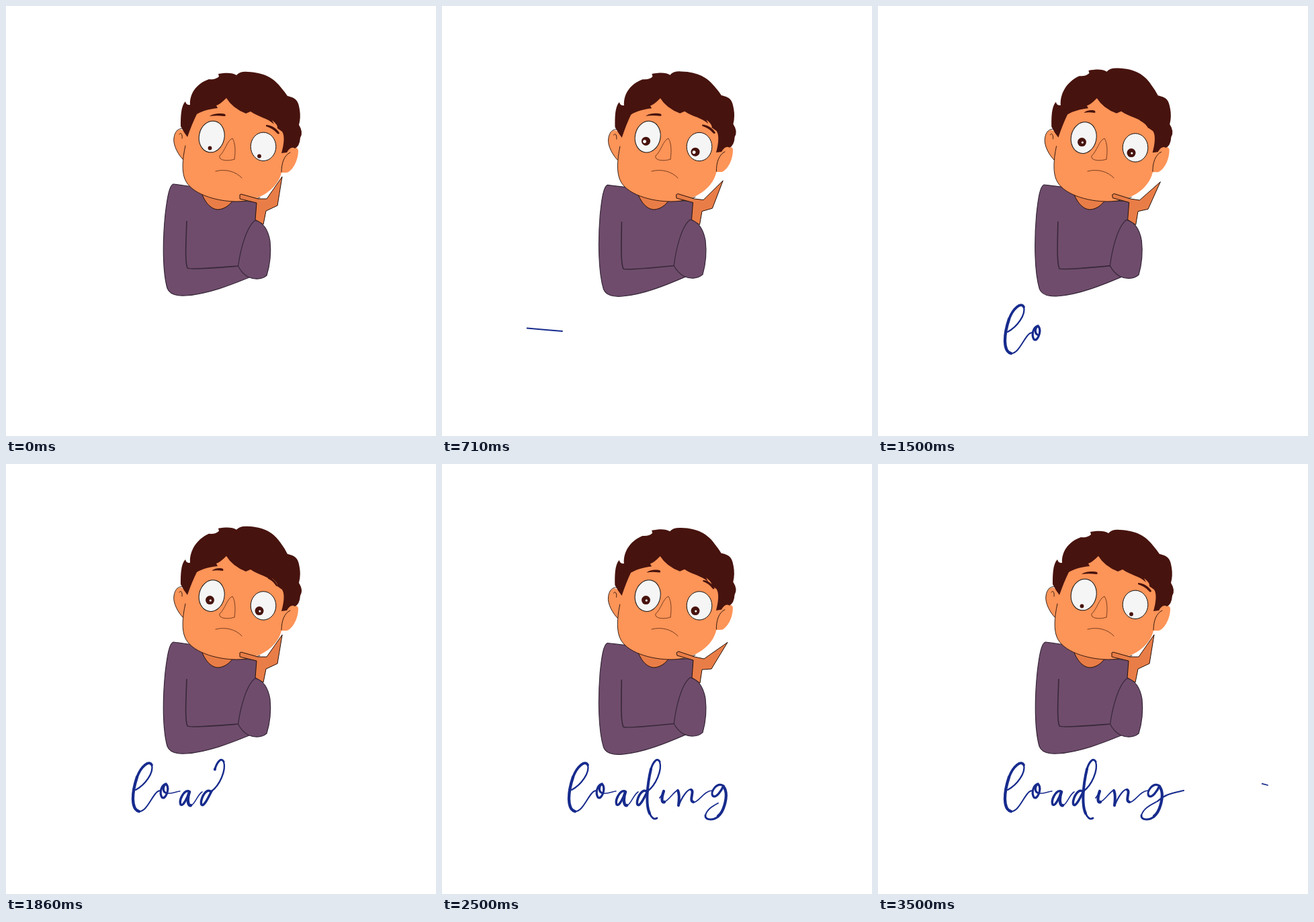
An HTML page for the animation above (3.57 s loop, 640 px wide and 640 px high).

```html
<!DOCTYPE html>
<html lang="en">
<head>
<meta charset="utf-8">
<title>Loading</title>
<style>
html, body { margin: 0; width: 100%; height: 100%; overflow: hidden; background: #fff; }
svg { display: block; width: 100%; height: 100%; }
.line { fill: none; stroke: #241008; stroke-width: .9; stroke-linecap: round; }
.fine { stroke: #5a2a12; stroke-width: .8; }
.skin { fill: #fd9458; }
.shade { fill: #e97d47; stroke: #241008; stroke-width: 1; stroke-linejoin: round; }
.dark { fill: #47130e; }
.cloth { fill: #6f4c6c; stroke: #38283a; stroke-width: 1.2; stroke-linejoin: round; }
.crease { fill: none; stroke-width: 1.6; }
.white { fill: #f5f5f5; stroke: #111; stroke-width: 1; }
#ink { fill: none; stroke: #172b8d; stroke-linecap: round; }
</style>
</head>
<body>
<svg viewBox="0 0 640 640">
  <g id="body">
    <path class="cloth" d="M249 265C243 267 240 285 237 310C233 350 233 395 240 420C243 428 252 432 268 431C300 429 335 415 362 404L380 370L376 319L377 293Q372 290 364 291L337 290L292 279L278 269Z"/>
    <path class="cloth crease" d="M269 320C268 350 266 380 270 390C273 393 320 389 346 387"/>
  </g>
  <path class="shade" d="M291 278C297 295 307 303 316 303C326 302 333 296 338 289Z"/>
  <g id="head">
    <path class="skin" d="M270 194C264 180 253 180 250 196C248 207 257 222 263 228L275 235Z"/>
    <path class="line" d="M267 185C262 180 252 182 250 196C248 207 257 222 263 228M258 191C260 187 263 191 262 197"/>
    <path class="skin" d="M408 222C416 208 434 207 435 215C435 232 425 246 418 248L406 248Z"/>
    <path class="skin" d="M267 208C262 230 262 247 266 257C274 279 312 291 343 291C380 291 405 270 410 248L415 214L421 170L330 130L280 150L268 185Z"/>
    <path class="line" d="M267 208C262 230 262 247 266 257C274 279 312 291 343 291C358 291 370 288 378 285M423 218C414 222 410 234 410 247"/>
    <path class="dark" id="hair"/>
  </g>
  <g id="eyes">
    <ellipse class="white" cx="306.2" cy="194.5" rx="18.8" ry="23.5" transform="rotate(12 306.2 194.5)"/>
    <ellipse class="white" cx="383" cy="209.3" rx="18.8" ry="21.2"/>
  </g>
  <path class="dark" id="browL" d="M303 164C308 160 320 159 326 161Q328 164 325 164C317 163 310 163 303 164Z"/>
  <path class="dark" id="browR" d="M387 177C395 177 403 182 407 189Q406 192 403 189C398 183 392 181 387 179Z"/>
  <path class="line fine" d="M340 228C342 215 341 203 337 197C329 200 326 216 318 223C316 231 333 231 340 228M312 246C326 242 342 246 351 256"/>
  <path class="shade" id="hand"/>
  <path class="cloth" id="sleeve" d="M371 319C382 322 390 332 393 350C395 370 392 388 388 401C380 408 368 407 360 403C353 399 348 392 345.500 387C349 362 358 328 371 319Z"/>
  <g id="ink"></g>
</svg>
<script>
const LOOP = 3570;
const $ = id => document.getElementById(id);
const make = (tag, parent, attrs) => {
  const el = document.createElementNS("http://www.w3.org/2000/svg", tag);
  set(el, attrs);
  return parent.appendChild(el);
};
function set(el, attrs) {
  for (const k in attrs) el.setAttribute(k, attrs[k]);
}
const ramp = (t, a, b) => Math.min(1, Math.max(0, (t - a) / (b - a)));
const ease = (t, a, b) => { const u = ramp(t, a, b); return u * u * (3 - 2 * u); };
const mix = (a, b, u) => a + (b - a) * u;

// path, width, start and end of drawing, optional start and end of erasing
const strokes = [
  ["M81 475C110 478 150 482 193 485", 1.8, 70, 801, 560, 930],
  ["M193 485C208 477 220 459 217 448", 2.3, 801, 1040],
  ["M217 448C213 440 201 450 195 466", 3.7, 1040, 1210],
  ["M195 466C187 490 186 514 198 517", 4.3, 1210, 1330],
  ["M198 517C208 518 215 499 223 490Q226 486 231 486", 2, 1330, 1420],
  ["M238 476C231 478 228 489 232 496C237 501 244 484 239 477C235 475 232 486 237 489", 3.2, 1420, 1500],
  ["M237 489C245 493 253 487 259 487", 1.5, 1500, 1540],
  ["M272 487C265 485 257 500 260 507C264 510 270 496 273 488", 3.4, 1540, 1610],
  ["M273 488C269 499 271 510 275 508", 4.4, 1610, 1640],
  ["M276 508C282 505 285 492 292 488", 1.6, 1640, 1680],
  ["M304 487C297 482 288 501 291 507C295 511 302 494 306 487", 3.5, 1680, 1790],
  ["M306 487C318 478 328 456 324 443", 2.3, 1790, 1830],
  ["M324 443C320 436 314 444 311 454", 3, 1830, 1860],
  ["M311 454C305 479 303 508 309 520", 4, 1860, 1960],
  ["M309 520Q314 531 320 527", 2.8, 1960, 2000],
  ["M324 497Q328 492 330 487", 1.8, 2000, 2030],
  ["M330 487C326 498 327 505 331 503", 4.2, 2030, 2070],
  ["M331 503C338 500 343 490 351 485", 1.7, 2070, 2110],
  ["M351 486Q354 492 352 508", 4, 2110, 2160],
  ["M352 509C357 496 365 484 371 484", 2.2, 2160, 2210],
  ["M371 485C376 487 367 502 374 503", 3.9, 2210, 2250],
  ["M374 504C384 502 389 487 402 486", 1.7, 2250, 2290],
  ["M417 478C408 475 399 488 403 494C408 498 416 486 419 479", 3.2, 2290, 2360],
  ["M419 480C428 492 419 518 411 524", 4.2, 2360, 2420],
  ["M411 525C403 531 391 530 392 523", 2.9, 2420, 2460],
  ["M392 523C395 512 407 507 416 502", 1.9, 2460, 2510],
  ["M416 502C428 491 438 490 455 486", 2.1, 2600, 2790],
  ["M455 486C485 477 505 471 530 471C550 470 565 474 580 478", 1.8, 2790, 3090, 2830, 3550]
].map(([d, w, from, to, cut = Infinity, end = Infinity]) => ({
  el: make("path", $("ink"), { d, "stroke-width": w, pathLength: 1 }), from, to, cut, end
}));

const pupils = [[303.5, 211.5, 201], [377, 223.5, 217]].map(([x, low, high]) => ({
  x, low, high,
  ball: make("circle", $("eyes"), { class: "dark", cx: x }),
  glint: make("circle", $("eyes"), { fill: "#fff" })
}));

const handRest = [[348, 281], [350, 280], [375, 287], [388, 287], [411, 254], [404, 297], [387, 305], [383, 325], [371, 318], [373, 293], [348, 287]];
const handOpen = [[349, 281], [352, 279], [376, 287], [390, 290], [425, 265.5], [401, 305], [387, 306], [384, 326], [372, 318], [374, 292], [350, 285]];

function hairPath(h) {
  const y = (v, k = 1) => v - h * k;
  return `M270 195L265 188L260 179C260 166 260 149 267 142Q268 148 274 147
    C273 ${y(132, .2)} 282 ${y(116, .6)} 302 ${y(109)}Q312 ${y(110)} 317 ${y(105)}L316 ${y(101)}
    C328 ${y(99)} 337 ${y(99)} 343 ${y(103)}Q348 ${y(97)} 360 ${y(98)}
    C385 ${y(99)} 399 ${y(108)} 409 ${y(121, .6)}Q415 ${y(128, .4)} 419 134
    C432 137 435 141 437 154Q439 166 436 177Q443 188 438 196Q437 209 430 212
    Q424 208 418 218L410 219C414 205 415 193 411 187L404 182Q405 177 396 170L399 176
    C388 166 377 166 364 157L357 160Q337 152 328 137Q318 147 313 148L315 152
    C304 153 292 156 284 161Q277 175 270 195Z`;
}

function draw(t) {
  const later = ease(t, 1250, 1900) - ease(t, 1900, 2500) + ease(t, 2500, 3070);
  const sway = ease(t, 60, 820) - later;
  const point = ease(t, 150, 1250) - later;
  const lift = ease(t, 620, 1230) - ease(t, 1950, 3060);
  const stare = Math.min(1, 2 * lift);
  const gaze = ease(t, 40, 620) - ease(t, 3020, 3500);

  for (const id of ["body", "sleeve"]) set($(id), { transform: `rotate(${-1.2 * sway} 320 400)` });
  set($("head"), { transform: `translate(${-sway} 0) rotate(${-.85 * sway} 340 291)` });
  set($("hair"), { d: hairPath(5.2 * lift) });
  const size = 1 - .28 * lift;
  set($("browL"), { transform: `translate(315 ${162 - 5 * lift}) scale(${size} 1) translate(-315 -162)` });
  set($("browR"), { transform: `translate(397 ${183 - 8.5 * lift}) scale(${size} 1) translate(-397 -183)` });

  set($("eyes"), { transform: `translate(0 ${1.6 * stare})` });
  for (const p of pupils) {
    const cy = mix(p.low, p.high, gaze);
    set(p.ball, { cy, r: mix(2.9, 6.5, gaze) });
    set(p.glint, { cx: mix(p.x - 2.3, p.x + .8, stare), cy: cy + .5, r: gaze * mix(2.6, 1.6, stare) });
  }

  const hand = handRest.map(([x, y], i) =>
    mix(x, handOpen[i][0], point) + " " + mix(y, handOpen[i][1], point));
  set($("hand"), { d: "M" + hand.join("L") + "Z" });

  for (const s of strokes) {
    const head = ramp(t, s.from, s.to);
    const tail = s.cut < Infinity ? ramp(t, s.cut, s.end) : 0;
    const len = head - tail;
    s.el.style.display = len > 0 ? "" : "none";
    set(s.el, { "stroke-dasharray": `${Math.max(len, 0)} 2`, "stroke-dashoffset": -tail });
  }
}

function tick(now) {
  draw(now % LOOP);
  requestAnimationFrame(tick);
}
draw(0);
requestAnimationFrame(tick);
</script>
</body>
</html>
```
